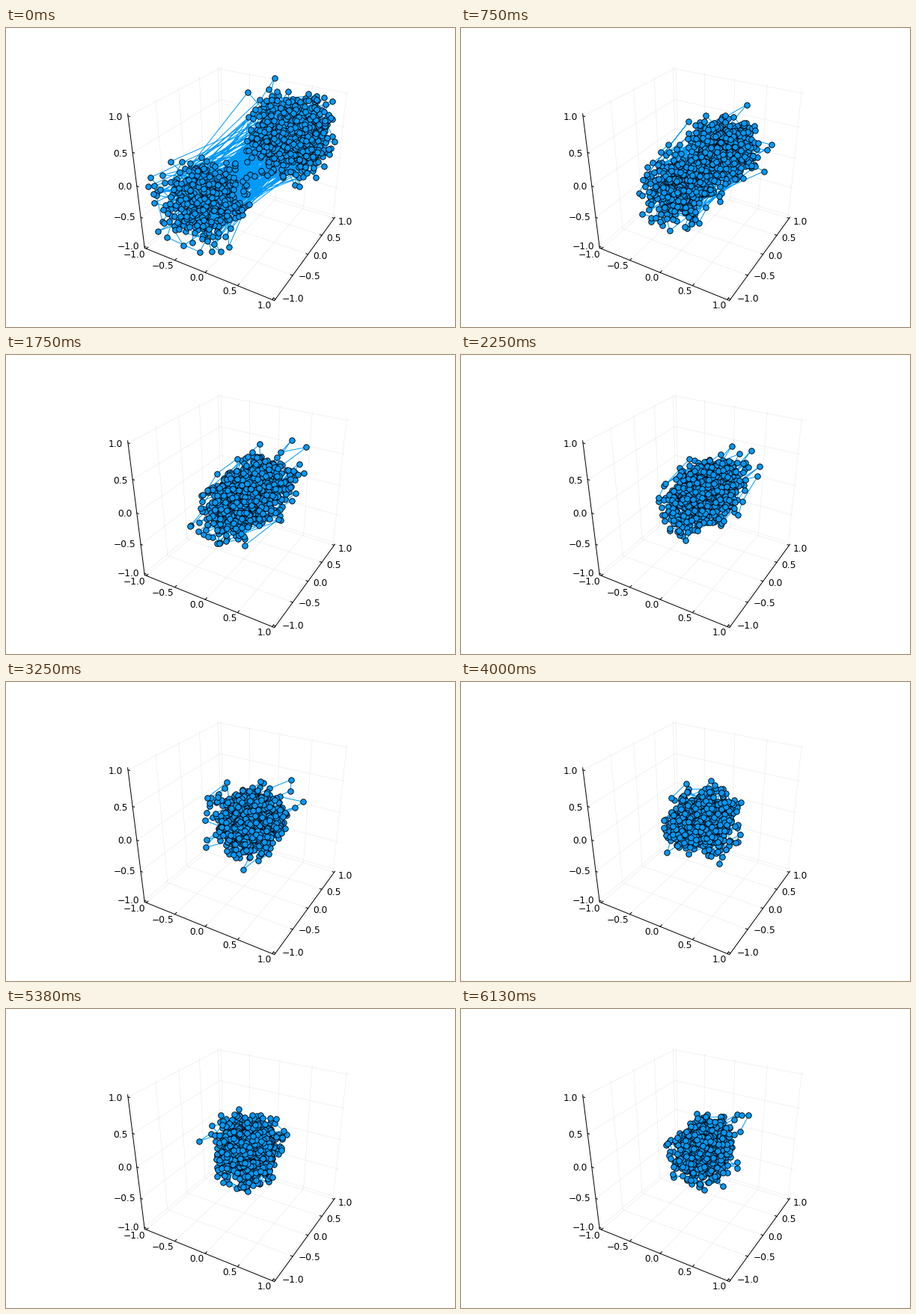
Recreate the animation shown at these times as a matplotlib script. Size 600 by 400 pixels, loop 6260 ms.

```python
import numpy as np
import matplotlib.pyplot as plt
from matplotlib.animation import FuncAnimation

W, H, DPI = 600, 400, 100
PX = 72 / DPI
BLUE = "#009afa"
LIM = 1.03
TICKS = (-1, -0.5, 0, 0.5, 1)
STEPS, COUNT = 50, 900
LOOP_MS, TICK_MS, STEP_MS = 6260, 20, 125

# Perspective camera: azimuth 30, elevation 30.
RIGHT = np.array([0.866, 0.5, 0])
UP = np.array([-0.25, 0.433, 0.866])
TOWARD = np.array([0.433, -0.75, 0.5])
DISTANCE, ZOOM, CENTER_X, CENTER_Y = 6.69, 668, 318, 192.4


def project(points):
    p = np.asarray(points, float) / LIM
    scale = ZOOM / (DISTANCE - p @ TOWARD)
    return CENTER_X + p @ RIGHT * scale, CENTER_Y - p @ UP * scale


def simulate():
    """Two cubes of shuffled chain beads relax into one compact coil."""
    rng = np.random.default_rng(7)
    side = np.cumprod(rng.choice([1, -1], (COUNT, 1), p=[0.7, 0.3]), axis=0)
    rate = rng.uniform(0.5, 2.5, (COUNT, 1))
    cube = rng.uniform(-0.5, 0.5, (COUNT, 3))

    def chain_noise(link=0.8):
        noise = rng.normal(size=(COUNT, 3))
        for i in range(1, COUNT):
            noise[i] = link * noise[i - 1] + np.sqrt(1 - link**2) * noise[i]
        return noise

    keep = 0.8
    coil = chain_noise()
    states = []
    for n in range(STEPS):
        apart = 0.44 * side * np.exp(-rate * n / 14)
        loose = np.exp(-(n + 0.5) / 5)
        body = 0.6 * np.tanh(coil * 0.215 / 0.6)
        states.append(0.045 + apart + loose * cube + np.sqrt(1 - loose**2) * body)
        coil = keep * coil + np.sqrt(1 - keep**2) * chain_noise()
    return states


fig = plt.figure(figsize=(W / DPI, H / DPI), dpi=DPI, facecolor="white")
ax = fig.add_axes([0, 0, 1, 1])
ax.set_xlim(0, W)
ax.set_ylim(H, 0)
ax.axis("off")


def segment(a, b, **style):
    ax.plot(*project([a, b]), **style)


def label(value, axis_point, dx, dy, align):
    x, y = project(axis_point)
    text = f"{value:.1f}".replace("-", "\u2212")
    ax.text(x + dx, y + dy + 3.6, text, ha=align, va="baseline",
            family="DejaVu Sans", size=8.8, color="black")


def draw_box():
    lo, hi = -LIM, LIM
    grid = dict(color="black", alpha=0.1, lw=0.5 * PX, zorder=1)
    edge = dict(color="black", lw=PX, zorder=2)
    for t in TICKS:
        segment((t, lo, lo), (t, hi, lo), **grid)
        segment((t, hi, lo), (t, hi, hi), **grid)
        segment((lo, t, lo), (hi, t, lo), **grid)
        segment((lo, t, lo), (lo, t, hi), **grid)
        segment((lo, lo, t), (lo, hi, t), **grid)
        segment((lo, hi, t), (hi, hi, t), **grid)

        segment((t, lo, lo), (t, lo + 0.04, lo), **edge)
        segment((hi, t, lo), (hi - 0.03, t, lo), **edge)
        segment((lo, lo, t), (lo + 0.03, lo, t), **edge)

        label(t, (t, lo, lo), -1.2, 7.7, "right")
        label(t, (hi, t, lo), 6.8 - 2 * t, 2.5 + 2.3 * t, "left")
        label(t, (lo, lo, t), -6.6, 1 + t, "right")
    segment((lo, lo, lo), (hi, lo, lo), **edge)
    segment((hi, lo, lo), (hi, hi, lo), **edge)
    segment((lo, lo, lo), (lo, lo, hi), **edge)


draw_box()
screen = [project(state) for state in simulate()]
chain, = ax.plot([], [], color=BLUE, lw=PX, marker="o", ms=7.5 * PX,
                 mfc=BLUE, mec="black", mew=0.9 * PX, zorder=3)


def update(tick):
    step = int((tick + 0.5) * TICK_MS // STEP_MS)
    chain.set_data(*screen[min(step, STEPS - 1)])
    return chain,


anim = FuncAnimation(fig, update, frames=LOOP_MS // TICK_MS, interval=TICK_MS,
                     repeat=True, repeat_delay=0, blit=False)
plt.show()
```
